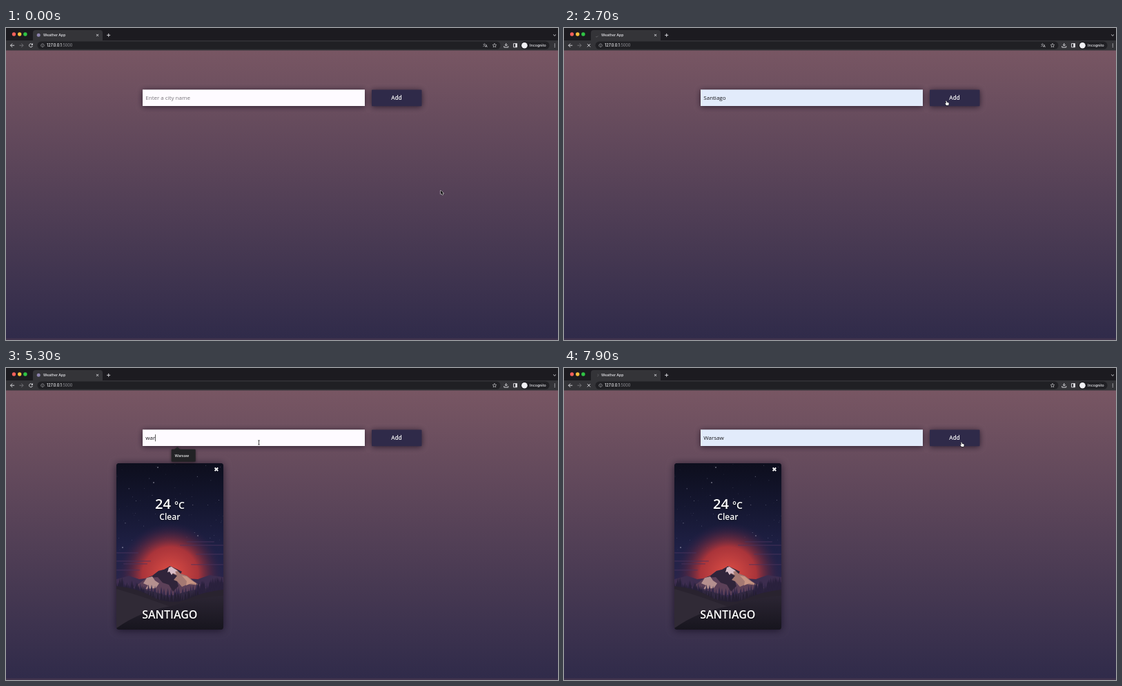
Animation of 800x452 px, one loop 8000 ms. Source, as an HTML page with a canvas:

```html
<!DOCTYPE html>
<html lang="en">
<head>
<meta charset="utf-8">
<title>Weather App</title>
<style>
html, body { margin: 0; height: 100%; overflow: hidden; background: #302b4a; }
canvas { display: block; width: 800px; height: 452px; }
</style>
</head>
<body>
<canvas id="stage" width="800" height="452"></canvas>
<script>
const ctx = document.getElementById('stage').getContext('2d');
const UI = 'Inter, sans-serif', PAGE = '"Open Sans", sans-serif';
const LOOP = 8000;

// Cursor path: time, x, y, shape from that time on
const PATH = [
  [0, 630, 235, 'arrow'], [500, 405, 109, 'beam'], [700, 400, 107, 'beam'],
  [1000, 300, 104, 'arrow'], [1500, 262, 122, 'arrow'], [1700, 264, 127, 'arrow'],
  [1900, 264, 127, 'arrow'], [2000, 290, 123, 'beam'], [2300, 540, 107, 'hand'],
  [2400, 555, 109, 'hand'], [3600, 555, 109, 'arrow'], [4200, 363, 117, 'arrow'],
  [4300, 366.5, 108, 'beam'], [5400, 366.5, 108, 'arrow'], [5800, 258, 126, 'arrow'],
  [6200, 258, 126, 'arrow'], [6400, 330, 122, 'arrow'], [6900, 572, 112, 'hand'],
  [7000, 575, 112, 'hand'], [7100, 577, 111, 'hand'], [LOOP, 577, 111, 'hand']
];
const CITIES = ['Santiago', 'Warsaw', 'Sydney', 'Detroit', 'Washington', 'Miami'];

function rect(x, y, w, h, color, radius = 0) {
  ctx.fillStyle = color;
  ctx.beginPath();
  ctx.roundRect(x, y, w, h, radius);
  ctx.fill();
}

function circle(x, y, r, color) {
  ctx.fillStyle = color;
  ctx.beginPath();
  ctx.arc(x, y, r, 0, 7);
  ctx.fill();
}

function text(str, x, y, size, color, font = UI, weight = 400, align = 'left') {
  ctx.font = `${weight} ${size}px ${font}`;
  ctx.textAlign = align;
  ctx.fillStyle = color;
  ctx.fillText(str, x, y);
}

function stroke(path, color = '#e4e4e8', width = 0.9) {
  ctx.strokeStyle = color;
  ctx.lineWidth = width;
  ctx.stroke(new Path2D(path));
}

function shape(path, color) {
  ctx.fillStyle = color;
  ctx.fill(new Path2D(path));
}

function gradient(y0, y1, ...colors) {
  const g = ctx.createLinearGradient(0, y0, 0, y1);
  colors.forEach((c, i) => g.addColorStop(i / (colors.length - 1), c));
  return g;
}

function shadowed(blur, color, dy, draw) {
  ctx.save();
  ctx.shadowBlur = blur;
  ctx.shadowColor = color;
  ctx.shadowOffsetY = dy;
  draw();
  ctx.restore();
}

function randomizer(seed) {
  return () => (seed = seed * 16807 % 2147483647) / 2147483647;
}

function drawTabIcon(t, loading, globe) {
  if (loading) {
    ctx.save();
    ctx.translate(47, 10.3);
    ctx.rotate(-t / 160);
    stroke('M0-2.6A2.6 2.6 0 0 1 2.6 0', '#67676d', 0.7);
    ctx.restore();
  } else if (globe) {
    circle(47, 10.3, 2.8, '#e8e8ea');
    stroke('M45 9.4l1.6.8-.4 1.6M47.2 8l.6 1.4 1.4.3M48 12.4l.5-1.2', '#3a3a3e', 0.7);
  } else {
    circle(47.2, 10.3, 2.5, '#8c83ad');
  }
}

function drawBrowser(t, loading, globe, translate) {
  rect(0, 0, 800, 20, '#1c1b20');
  rect(0, 18, 800, 14.5, '#343438');
  rect(39, 3, 101, 17, '#343438', [4, 4, 0, 0]);
  ['#f4605a', '#f6bd3b', '#2fc444'].forEach((c, i) => circle(11.5 + i * 8.2, 9, 2.7, c));
  drawTabIcon(t, loading, globe);
  text('Weather App', 54, 12.2, 5.2, '#ececf0', UI, 500);
  stroke('M131 8.9l3 3M134 8.9l-3 3M146.2 10.4h5M148.7 7.9v5M793.2 9.5l1.9 1.9 1.9-1.9');

  stroke('M12.2 25.2H6.6M9.2 22.5L6.5 25.2l2.7 2.7');
  stroke('M19.4 25.2h5.6M22.4 22.5l2.7 2.7-2.7 2.7', '#77777c');
  if (loading) stroke('M33.8 23l4.4 4.4M38.2 23l-4.4 4.4');
  else {
    stroke('M38.2 23.9A2.5 2.5 0 1 0 38.4 26');
    shape('M38.9 22v2.7h-2.7z', '#e4e4e8');
  }
  rect(45.5, 19.6, 671, 11.2, '#202024', 5.6);
  stroke('M53 22.9a2.3 2.3 0 1 0 .01 0M53 24.9v1.6M53 23.7v.5', '#b5b5ba', 0.6);
  text('127.0.0.1', 59, 27.2, 5.6, '#f2f2f4', UI, 500);
  ctx.font = `500 5.6px ${UI}`;
  text(':5000', 59 + ctx.measureText('127.0.0.1').width, 27.2, 5.6, '#929298');
  if (translate) {
    text('文', 691, 26, 4.5, '#c4c4c8', '"Noto Sans CJK SC", "Noto Sans CJK JP", sans-serif');
    text('A', 694.4, 28.2, 4.5, '#c4c4c8', UI, 600);
  }
  stroke('M708 22.3l.85 1.9 2 .2-1.5 1.4.45 2-1.8-1.05-1.8 1.05.45-2-1.5-1.4 2-.2z', '#c4c4c8', 0.7);
  stroke('M724.8 22v3.6M722.9 24l1.9 1.9 1.9-1.9M721.8 26.2v1.8h6v-1.8');
  stroke('M735.5 22.6h5v5.2h-5z');
  rect(738.2, 22.5, 2.5, 5.4, '#e4e4e8');
  rect(745.5, 19.6, 42, 11.2, '#202024', 5.6);
  circle(751.4, 25.2, 4.3, '#f1f1f4');
  text('Incognito', 759, 27.1, 5.3, '#ececf0', UI, 500);
  for (let i = -1; i < 2; i++) circle(795.3, 25.2 + i * 2.1, 0.65, '#e4e4e8');
}

function drawTrees(count, x0, x1, ground, height, color, seed) {
  const random = randomizer(seed);
  for (let i = 0; i < count; i++) {
    const x = x0 + (x1 - x0) * (i + random()) / count;
    const h = height * (0.5 + random() * 0.6), y = ground(x);
    shape(`M${x} ${y - h}l${h * 0.22} ${h + 3}h${-h * 0.44}z`, color);
  }
}

function drawScene() {
  rect(160, 138, 155, 241, gradient(138, 330, '#0d0e1d', '#151731', '#202147', '#30274c'));
  const random = randomizer(77);
  for (let i = 0; i < 65; i++) {
    const x = 160 + random() * 155, y = 139 + random() * 125;
    circle(x, y, 0.2 + random() * 0.35, `rgba(205,205,230,${0.2 + random() * 0.5})`);
  }
  [[220, 144], [214, 166], [278, 243], [169, 260]].forEach(([x, y]) => circle(x, y, 0.7, '#c9c9da'));

  const glow = ctx.createRadialGradient(238, 300, 12, 238, 300, 76);
  glow.addColorStop(0, '#d04742');
  glow.addColorStop(0.45, '#a9343a');
  glow.addColorStop(0.72, 'rgba(96,40,64,.65)');
  glow.addColorStop(1, 'rgba(45,33,72,0)');
  rect(160, 224, 155, 110, glow);
  [[262, 251, 40], [252, 256, 63], [160, 267, 32], [275, 269, 40], [160, 279, 50],
   [170, 283, 35], [268, 284, 47], [160, 292, 34]]
    .forEach(([x, y, w]) => rect(x, y, w, 1.5, 'rgba(75,52,94,.55)', 0.7));

  shape('M160 306l18-5 15 5 30-4 55 4 17-6 20 3v50H160z', '#3d2d4f');
  shape('M180 321l12-8 12-9 8-3 9-7 8-2 9-5 9 5 6 6 9 3 10 8 12 6 16 9v5H180z', '#5c4058');
  shape('M238 287l-9 5-8 2-9 7-8 3 16-1 7 8 9 3 6 10 8-8-3-10 5-6 3-5-8-4z', '#30243a');
  shape('M238 287l9 5 6 6 9 3 10 8 9 6-17-2-9 4-7-8-5-2 5-6-8-4z', '#a57972');
  shape('M204 304l8-2 4 6 6 4-5 7-15 1 4-5-7-3z', '#b5908f');
  shape('M236 289l4-1 4 3 5 3-4 1 2 4-5-2-2 3-3-5-3 1z', '#d8bdc6');
  shape('M255 301l7 1 7 6 8 5-9-1-7 3 1-6z', '#c79483');

  const backHill = x => 319 + 13 * Math.exp(-(((x - 237) / 38) ** 2));
  drawTrees(42, 160, 315, backHill, 13, '#35294b', 9);
  shape('M160 318Q205 318 237 332Q270 318 315 318V379H160z', '#322942');
  drawTrees(20, 160, 200, x => 320 + (x - 160) * 0.22, 17, '#272039', 31);
  drawTrees(20, 275, 315, x => 330 - (x - 275) * 0.22, 19, '#2a213d', 17);
  drawTrees(34, 195, 280, x => 338 - Math.abs(x - 238) * 0.15, 12, '#251f32', 5);
  shape('M160 316Q190 318 217 334Q244 344 267 333Q288 324 315 321V379H160z', '#29232f');
  shape('M160 320Q205 333 238 346Q213 358 160 377z', '#302a36');
  shape('M160 377Q195 352 239 345Q278 332 315 330V379H160z', gradient(330, 379, '#2b2533', '#17151e'));
}

function drawCard() {
  shadowed(11, 'rgba(15,10,28,.75)', 1, () => rect(160, 138, 155, 241, '#151527', 4));
  ctx.save();
  ctx.beginPath();
  ctx.roundRect(160, 138, 155, 241, 4);
  ctx.clip();
  drawScene();
  ctx.restore();
  stroke('M302.6 144.5l4.6 4.6M307.2 144.5l-4.6 4.6', '#fff', 1.9);
  shadowed(3, 'rgba(0,0,0,.6)', 1, () => {
    text('24', 216, 204.3, 20, '#fff', PAGE, 600);
    text('°C', 244, 204.3, 14, '#fff', PAGE, 600);
    text('Clear', 237.3, 219.8, 12, '#fff', PAGE, 600, 'center');
    text('SANTIAGO', 237.3, 363, 16, '#fff', PAGE, 600, 'center');
  });
}

function drawForm(value, size, filled, caret) {
  shadowed(8, 'rgba(20,12,30,.75)', 1, () => {
    rect(198, 89.3, 322, 23.7, filled ? '#e2ebfb' : '#fefbff');
    rect(530, 89.5, 72.5, 23.8, '#2f2a49', 1);
  });
  if (value) text(value, 202.3, 104, size, '#16161a', size < 8 ? UI : PAGE);
  else text('Enter a city name', 202.3, 104, 8, '#77737a', PAGE);
  if (caret) {
    ctx.font = `400 8px ${PAGE}`;
    const typed = size < 8 ? '' : value;
    rect(202.4 + ctx.measureText(typed).width, 96.3, 0.7, 10, '#111');
  }
  text('Add', 566, 104, 8, '#fff', PAGE, 600, 'center');
}

function drawList(items, hover) {
  const w = items.includes('Washington') ? 45 : 35, h = items.length * 15 + 3;
  shadowed(4, 'rgba(0,0,0,.5)', 1, () => {
    shape('M244 118.3l4.3-4 4.3 4z', '#29292c');
    rect(239.7, 117.7, w, h, '#222225', 1);
  });
  if (hover) rect(239.7, 119.2, w, 14.8, '#38383b');
  items.forEach((city, i) => text(city, 244.6, 128.7 + i * 15, 5.4, '#f0f0f2', UI, 500));
}

function drawCursor(t) {
  const i = PATH.findLastIndex(p => p[0] <= t);
  const [t0, x0, y0, kind] = PATH[i], [t1, x1, y1] = PATH[i + 1];
  const k = (t - t0) / (t1 - t0), e = k * k * (3 - 2 * k);
  ctx.save();
  ctx.translate(x0 + (x1 - x0) * e, y0 + (y1 - y0) * e);
  if (kind === 'beam') {
    stroke('M-1.3-3h2.6M-1.3 3h2.6M0-3v6', '#222', 0.8);
  } else {
    const path = kind === 'hand'
      ? 'M-1.6-3.2q.7-.5 1.1.3l.5 1.7 2 .5q1 .3.8 1.3l-.6 2.4h-3L-2.5.7q-.1-.9.8-.6l.6.4z'
      : 'M0 0v6l1.4-1.2 1 2.2 1.1-.5-1-2.1h1.9z';
    stroke(path, kind === 'hand' ? '#111' : '#f2f2f2', 1);
    shape(path, kind === 'hand' ? '#fff' : '#111');
  }
  ctx.restore();
}

function formState(t) {
  if (t < 1000) return { value: '', focus: t >= 800 ? 800 : 0 };
  if (t < 1900) return { value: t >= 1600 ? 'Santiago' : '', size: t >= 1600 ? 5.4 : 8,
    filled: t >= 1600, focus: 800, list: CITIES, hover: t >= 1600 };
  if (t < 3100) return { value: 'Santiago', filled: true, focus: t < 2500 ? 1900 : 0 };
  if (t < 4800) return { value: '', focus: t >= 4500 ? 4500 : 0 };
  if (t < 6000) {
    const n = Math.min(3, Math.floor((t - 4600) / 200)), hover = t >= 5700;
    return { value: hover ? 'Warsaw' : 'war'.slice(0, n), size: hover ? 5.4 : 8, filled: hover,
      focus: 4400 + Math.min(n, 4) * 200 + 200, hover,
      list: CITIES.filter(c => c.toLowerCase().startsWith('war'.slice(0, n))) };
  }
  return { value: 'Warsaw', filled: true, focus: t < 7200 ? 6000 : 0 };
}

function draw(t) {
  const hasCard = t >= 3100;
  const loading = t >= 2700 && t < 3100 || t >= 7300;
  const waiting = t >= 3100 && t < 3600;
  const { value, size = 8, filled, focus, list, hover } = formState(t);

  rect(0, 32, 800, 420, gradient(32, 449, '#785663', '#302b4a'));
  rect(0, 449.5, 800, 2.5, '#41344d');
  drawBrowser(t, loading, waiting, !hasCard);
  drawForm(value, size, filled, focus && (t - focus) % 1000 < 500);
  if (hasCard) drawCard();
  if (list) drawList(list, hover);
  if (waiting) {
    rect(0, 443.3, 267.5, 8.7, '#202024', [0, 2, 0, 0]);
    text('Waiting for img.icons8.com...', 2, 449.6, 5.2, '#e6e6ea', UI, 500);
  }
  drawCursor(t);
}

function tick() {
  draw(Math.floor(performance.now() % LOOP / 100) * 100);
  requestAnimationFrame(tick);
}
tick();
</script>
</body>
</html>
```
